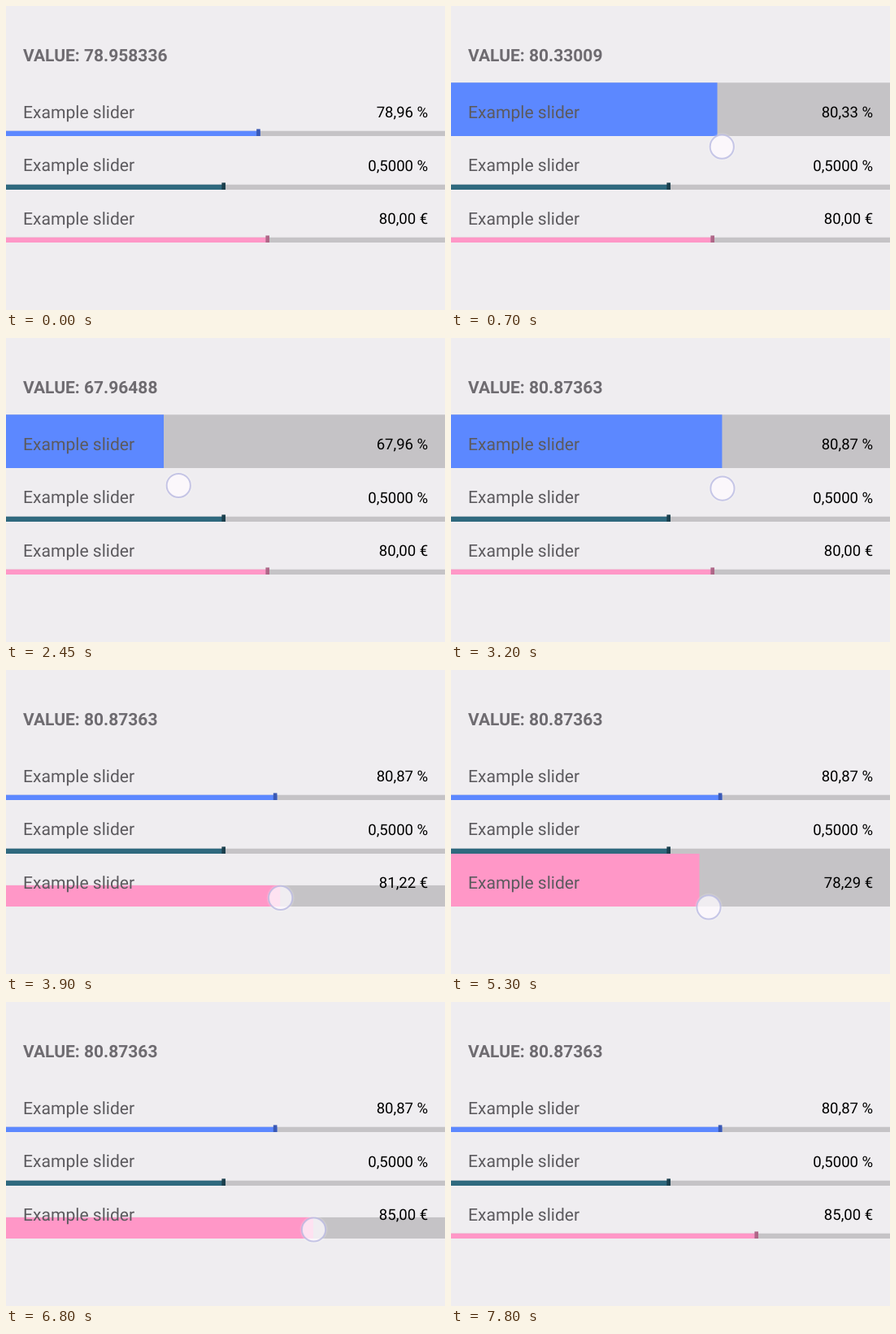
These frames come from a looping animation (540 by 374 pixels, 7850 ms). An HTML page:

```html
<!DOCTYPE html>
<html lang="en">
<head>
<meta charset="utf-8">
<title>Sliders</title>
<style>
  html, body { margin: 0; width: 100%; height: 100%; overflow: hidden; background: #efedf0; }
  svg { display: block; width: 540px; height: 374px; font: 21px Roboto, sans-serif; text-rendering: geometricPrecision; }
  .title { font-weight: 700; fill: #6e6b70; }
  .label { font-size: 21.1px; fill: #5c5a5e; }
  .value { font-size: 18.55px; text-anchor: end; fill: #000; }
</style>
</head>
<body>
<svg id="stage" viewBox="0 0 540 374"></svg>
<script>
const LOOP = 7850, STEP = 50, WIDTH = 540, ROW = 65.7, THIN = 6.3;
const GROW = 150;  // time a bar takes to open or close
const LAG = 75;    // how far a bar trails the finger
const stage = document.getElementById('stage');

function set(el, attrs) {
  for (const k in attrs) el.setAttribute(k, attrs[k]);
}
function add(tag, attrs, parent = stage) {
  const el = document.createElementNS('http://www.w3.org/2000/svg', tag);
  set(el, attrs);
  return parent.appendChild(el);
}
const clamp = x => Math.max(0, Math.min(1, x));

// Smooth curve through [time, value] keys, at rest at both ends.
function track(keys, t) {
  const last = keys.length - 1;
  if (t <= keys[0][0]) return keys[0][1];
  if (t >= keys[last][0]) return keys[last][1];
  const i = keys.findIndex(k => k[0] > t) - 1;
  const slope = j => j === 0 || j === last ? 0 :
    (keys[j + 1][1] - keys[j - 1][1]) / (keys[j + 1][0] - keys[j - 1][0]);
  const [t0, a] = keys[i], [t1, b] = keys[i + 1];
  const d = t1 - t0, u = (t - t0) / d, v = 1 - u;
  return a * v * v * (1 + 2 * u) + b * u * u * (3 - 2 * u) +
    d * u * v * (v * slope(i) - u * slope(i + 1));
}

const money = v => v.toFixed(2).replace('.', ',') + ' €';
const percent = digits => v => v.toFixed(digits).replace('.', ',') + ' %';
const rows = [
  { min: 50, max: 100, rest: 78.958336, color: '#5c88ff', dark: '#3a59b4', text: percent(2) },
  { min: 0, max: 1, rest: 0.5, color: '#2f697e', dark: '#1b3f4d', text: percent(4) },
  { min: 50, max: 100, rest: 80, color: '#ff97c7', dark: '#ae6788', text: money }
];
const [blue, , pink] = rows;

// Each touch drags one slider through a few turning points; the finger drifts from y0 to y1.
const touches = [
  { row: blue, start: 250, end: 3400, y0: 171, y1: 186,
    keys: [[400, blue.rest], [1000, 81.5], [1500, 77.47818], [2050, 60], [2450, 67.96488], [3100, 80.87363]] },
  { row: pink, start: 3850, end: 6050, y0: 280, y1: 298,
    keys: [[4000, 81.22], [4400, 87], [4950, 72.5], [5300, 78.29], [6000, 86]] },
  { row: pink, start: 6750, end: 7350, y0: 280, y1: 280, keys: [[6750, 85]] }
];

const edge = (row, v) => (v - row.min) / (row.max - row.min) * WIDTH;

// Lower rows lie underneath the upper ones, all text on top.
rows.forEach((row, i) => row.bottom = Math.round(159.8 + ROW * i));
for (const row of [...rows].reverse()) {
  row.track = add('rect', { width: WIDTH, fill: '#c5c3c6' });
  row.bar = add('rect', { fill: row.color });
  row.thumb = add('rect', { y: row.bottom - 8.6, width: 4.6, height: 8.6, fill: row.dark });
}
const title = add('text', { class: 'title', x: 21, y: 67.7 });
rows.forEach((row, i) => {
  add('text', { class: 'label', x: 21, y: 137.5 + ROW * i }).textContent = 'Example slider';
  row.value = add('text', { class: 'value', x: 519.2, y: 136.8 + ROW * i });
});

const finger = add('g', {});
add('circle', { r: 17, fill: '#fff', 'fill-opacity': 0.15 }, finger);
add('circle', { r: 14.6, fill: '#fdf9fe', 'fill-opacity': 0.72, stroke: '#b9bae2', 'stroke-opacity': 0.8, 'stroke-width': 2 }, finger);

function draw(t) {
  for (const row of rows) {
    const touch = touches.findLast(o => o.row === row && t >= o.start);
    const v = touch ? track(touch.keys, t) : row.rest;
    const open = touch ? Math.min(clamp((t - touch.start) / GROW), 1 - clamp((t - touch.end) / GROW)) : 0;
    const x = edge(row, v), height = THIN + (ROW - THIN) * open, y = row.bottom - height;
    set(row.track, { y, height });
    set(row.bar, { y, height, width: x });
    set(row.thumb, { x: x - 4.6, visibility: open ? 'hidden' : 'visible' });
    row.value.textContent = row.text(v);
    if (row === blue) title.textContent = 'VALUE: ' + v.toPrecision(v === row.rest ? 8 : 7);
  }

  const touch = touches.find(o => t >= o.start && t < o.end);
  finger.setAttribute('visibility', touch ? 'visible' : 'hidden');
  if (touch) {
    const x = edge(touch.row, track(touch.keys, t + LAG));
    const y = touch.y0 + (touch.y1 - touch.y0) * (t - touch.start) / (touch.end - touch.start);
    finger.setAttribute('transform', `translate(${x + 0.5} ${y})`);
  }
}

function frame() {
  draw(Math.floor(performance.now() % LOOP / STEP) * STEP);
  requestAnimationFrame(frame);
}
frame();
</script>
</body>
</html>
```
